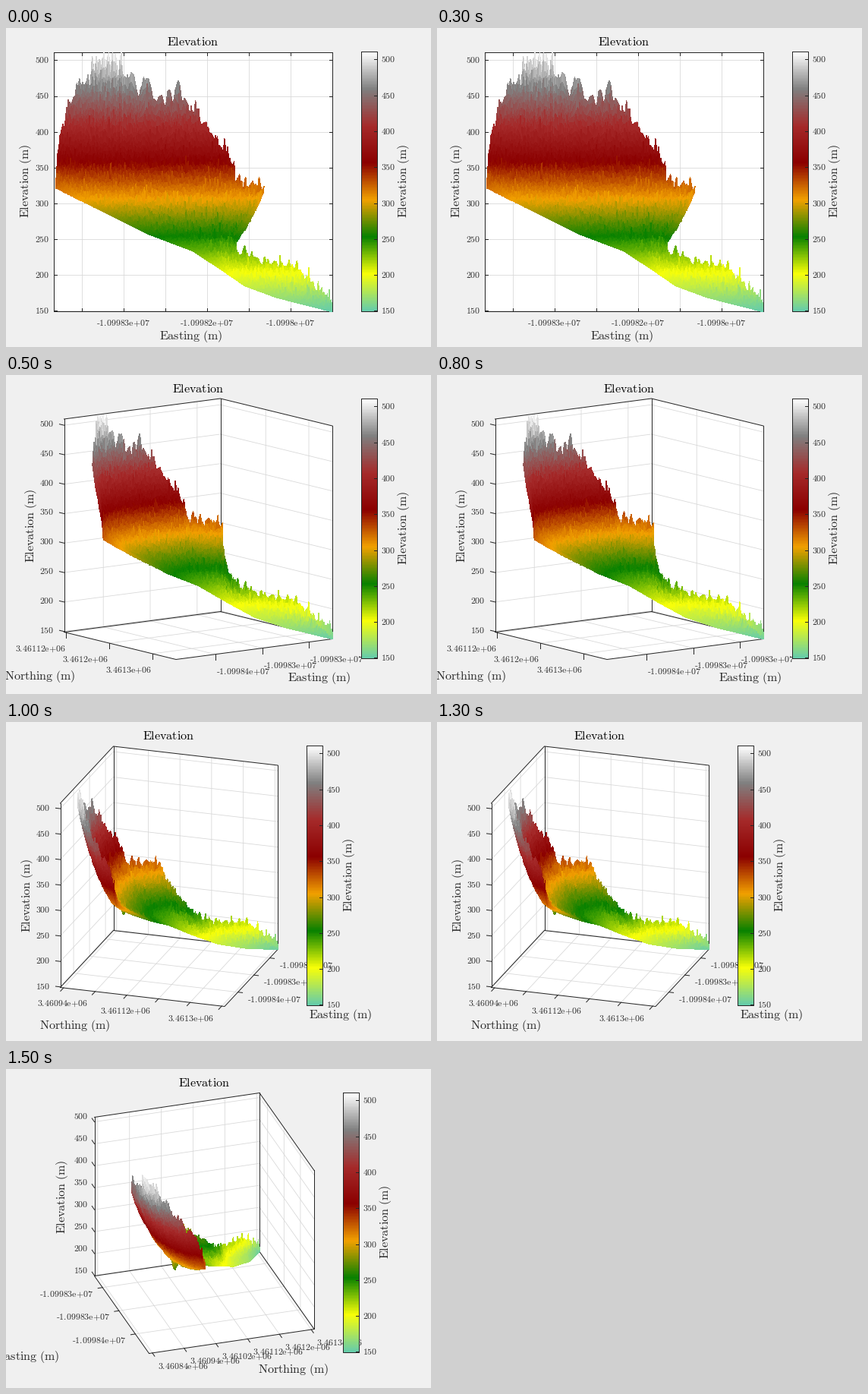
A matplotlib script for the animation above (2 s loop, 560x420 px).

```python
import numpy as np
import matplotlib.pyplot as plt
from collections import namedtuple
from matplotlib.animation import FuncAnimation
from matplotlib.collections import PolyCollection
from matplotlib.colors import LinearSegmentedColormap

WIDTH, HEIGHT = 560, 420
LOW, HIGH = 148.9, 510.5
INK, GRID, PAPER = "#262626", "#d8d8d8", "#f0f0f0"
EASTING, NORTHING, ELEVATION = "Easting (m)", "Northing (m)", "Elevation (m)"

plt.rcParams["mathtext.fontset"] = "cm"

dem = LinearSegmentedColormap.from_list("dem", [
    "#66cdaa", "#f8ff08", "#088100", "#f2a100",
    "#8b0000", "#a52a2a", "#808080", "#ffffff"])

# A view maps the unit cube to the stage; u, v, w are easting, northing, height.
View = namedtuple("View", "origin u v w back rules names title bar")
Rule = namedtuple("Rule", "axis base steps tick shift align texts")

LEVELS = range(150, 501, 50)
Z_STEPS = [(z - LOW) / (HIGH - LOW) for z in LEVELS]
Z_TEXTS = [str(z) for z in LEVELS]
U_FINE = [0.101 + 0.15 * k for k in range(6)]
U_STEPS = U_FINE[1::2]
V_FINE = [0.02 + 0.1925 * k for k in range(6)]
V_STEPS = V_FINE[:5:2]


def east(*tails):
    return [f"-1.09{t}e+07" if t else "" for t in tails]


def north(*tails):
    return [f"3.46{t}e+06" if t else "" for t in tails]


def heights(base, tick, shift):
    return Rule(2, base, Z_STEPS, tick, shift, "right", Z_TEXTS)


VIEWS = [
    View((62, 373), (367, 0), (0, 0), (0, -341), 0, [
        Rule(0, (0, 0, 0), U_FINE, (0, -4), (0, 14), "center",
             east("", "983", "", "982", "", "98")),
        Rule(0, (0, 0, 1), U_FINE, (0, 4), None, None, None),
        heights((0, 0, 0), (4, 0), (-5, 0)),
        Rule(2, (1, 0, 0), Z_STEPS, (-4, 0), None, None, None)],
        [(EASTING, 243, 404, "center", 0), (ELEVATION, 24, 201, "center", 90)],
        246, 467),
    View((76, 338), (206, -27), (147.5, 36), (0, -280.5), 0, [
        Rule(0, (0, 1, 0), U_STEPS, (0, 7), (1, 22), "left",
             east("984", "983", "983")),
        Rule(1, (0, 0, 0), V_STEPS, (0, 7), (-1, 20.5), "right",
             north("112", "12", "13")),
        heights((0, 0, 0), (-6, -1.4), (-13, -2))],
        [(EASTING, 412.5, 397, "center", 0), (NORTHING, 91, 395, "right", 0),
         (ELEVATION, 31.5, 198, "center", 90)],
        253, 467),
    View((71, 349), (70, -75), (216.5, 25), (0, -242.5), 0, [
        Rule(0, (0, 1, 0), U_STEPS, (6, 0.7), (12, 9), "left",
             east("984", "983", "982")),
        Rule(1, (0, 0, 0), V_FINE, (-4, 4.3), (-10, 15.5), "right",
             north("", "094", "", "112", "", "13")),
        heights((0, 0, 0), (-6, -0.7), (-13, -1))],
        [(EASTING, 440.5, 384, "center", 0), (NORTHING, 90.5, 398, "center", 0),
         (ELEVATION, 26.5, 228, "center", 90)],
        214, 395),
    View((188, 374), (-72, -102), (217.5, -32), (0, -209), 1, [
        Rule(0, (0, 0, 0), U_STEPS, (-6, 0.9), (-12, 8), "right",
             east("984", "983", "983")),
        Rule(1, (0, 0, 0), V_FINE, (3, 4.3), (7, 16.5), "left",
             north("084", "094", "102", "112", "12", "13")),
        heights((1, 0, 0), (-3.2, -4.6), (-8, -7))],
        [(EASTING, 70, 377, "right", 0), (NORTHING, 378, 394, "center", 0),
         (ELEVATION, 72.5, 168, "center", 90)],
        261, 443),
]

# Crest of the basin: u, v, w and the easting of the foot of its slope.
CREST = np.array([
    (0.008, 0.34, 0.478, 0.008), (0.02, 0.30, 0.64, 0.04),
    (0.06, 0.17, 0.80, 0.10), (0.185, 0.045, 0.97, 0.20),
    (0.30, 0.035, 0.87, 0.27), (0.474, 0.05, 0.79, 0.34),
    (0.56, 0.10, 0.70, 0.40), (0.648, 0.16, 0.55, 0.45),
    (0.655, 0.20, 0.49, 0.47), (0.757, 0.36, 0.455, 0.51),
    (0.70, 0.44, 0.37, 0.55), (0.635, 0.58, 0.28, 0.60),
    (0.66, 0.65, 0.22, 0.64), (0.749, 0.69, 0.185, 0.74),
    (0.872, 0.85, 0.16, 0.87), (0.937, 0.93, 0.08, 0.94),
    (1, 1, 0.015, 1)])

# Line along the foot of the slopes down to the outlet.
FOOT = np.array([
    (0.008, 0.34, 0.478), (0.2, 0.40, 0.375), (0.34, 0.45, 0.30),
    (0.5, 0.50, 0.235), (0.605, 0.61, 0.161), (0.687, 0.74, 0.10),
    (0.8, 0.87, 0.055), (1, 1, 0)])


def terrain(along=420, across=44):
    """Concave slopes from crest to foot, with tree-like spikes."""
    rng = np.random.default_rng(11)
    run = np.r_[0, np.cumsum(np.linalg.norm(np.diff(CREST[:, :3], axis=0), axis=1))]
    at = np.linspace(0, run[-1], along)
    u, v, w, low_u = (np.interp(at, run, col)[:, None] for col in CREST.T)
    low_v, low_w = (np.interp(low_u, FOOT[:, 0], FOOT[:, k]) for k in (1, 2))
    t = np.linspace(0, 1, across)

    spikes = np.convolve(rng.normal(size=along), [0.4, 0.8, 0.4], "same")[:, None]
    relief = (w - low_w) * (1 + 0.05 * spikes)
    trees = 0.009 * rng.exponential(size=(along, across)) * (1 - t ** 6)
    x = u + (low_u - u) * t
    y = v + (low_v - v) * t
    z = low_w + relief * (1 - t) ** 2.6 + trees
    z -= 0.06 * np.exp(-((x - 0.352) ** 2 + (y - 0.27) ** 2) / 0.014 ** 2)
    return np.stack([x, y, np.clip(z, 0, 1)], axis=-1)


def quads(grid):
    return np.stack([grid[:-1, :-1], grid[1:, :-1], grid[1:, 1:], grid[:-1, 1:]],
                    axis=2).reshape(-1, 4, grid.shape[-1])


FACES = quads(terrain())

fig = plt.figure(figsize=(WIDTH / 72, HEIGHT / 72), dpi=72, facecolor=PAPER)
ax = fig.add_axes([0, 0, 1, 1])


def project(view, points):
    return np.array(view.origin, float) + np.dot(
        points, np.array([view.u, view.v, view.w], float))


def line(points, color=INK, width=1.0, order=3):
    xs, ys = zip(*points)
    ax.plot(xs, ys, color=color, lw=width, zorder=order)


def write(text, x, y, size, align, turn=0, color=INK, order=6):
    """Place text with its capitals centred on the given point."""
    drop = 0.33 * size
    x, y = (x + drop, y) if turn else (x, y + drop)
    ax.text(x, y, text, fontsize=size, color=color, ha=align, va="baseline",
            rotation=turn, rotation_mode="anchor", zorder=order)


def label(text, *args, **kw):
    write(r"$\mathrm{%s}$" % text.replace(" ", r"\ "), *args, **kw)


def number(text, x, y, align, order=6):
    write(r"$\text{%s}$" % text, x, y, 11.9, align, color="#303030", order=order)


def draw_box(view):
    def path(*points):
        return project(view, points)

    b = view.back
    floor = [(0, 0, 0), (1, 0, 0), (1, 1, 0), (0, 1, 0), (0, 0, 0)]
    posts = [(0, b), (1, b), (1, 1 - b)]
    top = [(*post, 1) for post in posts]
    for face in (floor, top[:2] + [(1, b, 0), (0, b, 0)],
                 top[1:] + [(1, 1 - b, 0), (1, b, 0)]):
        ax.fill(*path(*face).T, color="white", lw=0, zorder=1)
    line(path(*floor))
    line(path(*top))
    for post in posts:
        line(path((*post, 0), (*post, 1)))

    steps = {rule.axis: rule.steps for rule in view.rules}
    for u in steps.get(0, []):
        line(path((u, 1 - b, 0), (u, b, 0), (u, b, 1)), GRID, 0.8, 2)
    for v in steps.get(1, []):
        line(path((0, v, 0), (1, v, 0), (1, v, 1)), GRID, 0.8, 2)
    for w in steps[2]:
        line(path((0, b, w), (1, b, w), (1, 1 - b, w)), GRID, 0.8, 2)


def draw_terrain(view):
    """Paint the faces from the farthest to the nearest."""
    across, down = np.array([view.u, view.v, view.w], float).T
    middle = FACES.mean(axis=1)
    order = np.argsort(middle @ np.cross(across, down))
    ax.add_collection(PolyCollection(
        project(view, FACES[order]), facecolors=dem(middle[order, 2]),
        edgecolors="face", linewidths=0.4, antialiaseds=False, zorder=4))


def draw_rule(view, rule):
    for k, step in enumerate(rule.steps):
        point = list(rule.base)
        point[rule.axis] = step
        x, y = project(view, point)
        line([(x, y), (x + rule.tick[0], y + rule.tick[1])])
        if rule.texts and rule.texts[k]:
            number(rule.texts[k], x + rule.shift[0], y + rule.shift[1], rule.align)


def draw_bar(x):
    top, bottom, right = 31, 373, x + 21
    ax.imshow(np.linspace(1, 0, 256)[:, None], cmap=dem, aspect="auto",
              extent=(x, right, bottom, top), zorder=8)
    line([(x, top), (right, top), (right, bottom), (x, bottom), (x, top)], order=9)
    for step, text in zip(Z_STEPS, Z_TEXTS):
        y = bottom + (top - bottom) * step
        line([(right - 4, y), (right, y)], order=9)
        number(text, right + 5, y, "left", order=9)
    label(ELEVATION, x + 55.5, 201, 16, "center", 90, order=9)


def draw(k):
    view = VIEWS[k]
    ax.clear()
    ax.axis("off")
    draw_box(view)
    draw_terrain(view)
    for rule in view.rules:
        draw_rule(view, rule)
    for text, x, y, align, turn in view.names:
        label(text, x, y, 16, align, turn)
    label("Elevation", view.title, 17, 16, "center", color="black")
    draw_bar(view.bar)
    ax.set_xlim(-0.5, WIDTH - 0.5)
    ax.set_ylim(HEIGHT - 0.5, -0.5)
    return []


anim = FuncAnimation(fig, draw, frames=len(VIEWS), init_func=lambda: [],
                     interval=500, repeat=True, repeat_delay=0, blit=False)
plt.show()
```
